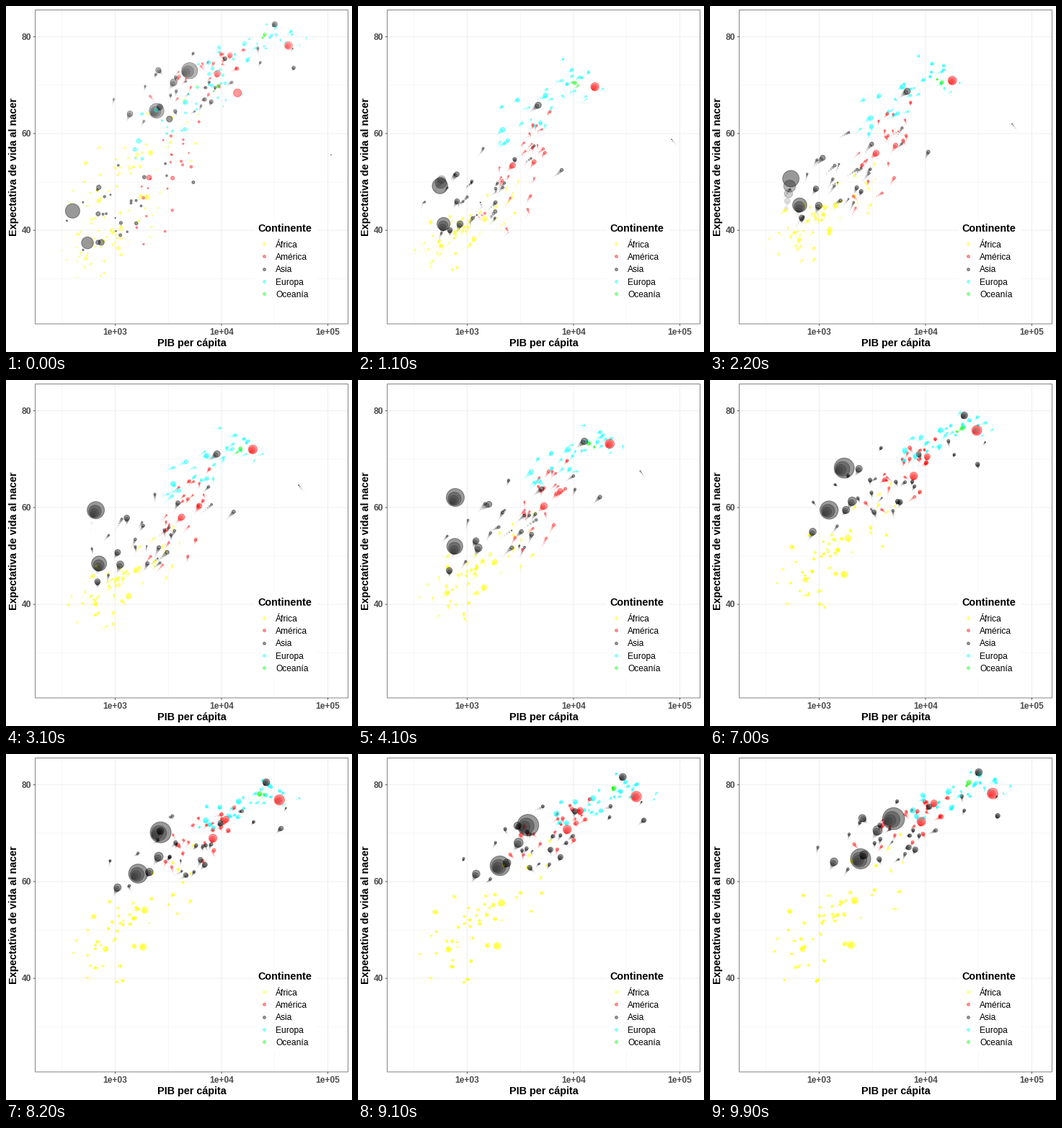
A matplotlib script that plays this animation: 480 px wide and 480 px high, repeating every 10 s.

```python
import numpy as np
import matplotlib.pyplot as plt
from matplotlib.animation import FuncAnimation
from matplotlib.patches import Rectangle

plt.rcParams["font.family"] = "Liberation Sans"

SIZE, FRAMES, WAKE, ALPHA = 480, 100, 10, 0.4
LEFT, RIGHT, TOP, BOTTOM = 40.5, 474.5, 5.5, 441
COLORS = {
    "África": (1, 1, 0), "América": (1, 0, 0), "Asia": (0, 0, 0),
    "Europa": (0, 1, 1), "Oceanía": (0, 1, 0),
}
STEPS = np.arange(12)  # one survey every five years
KEYS = (0, 6, 11)      # surveys at which a path has key points
NOW = np.linspace(0, 11, FRAMES)

rng = np.random.default_rng(7)
xs, ys, radii, tints = [], [], [], []


def px(log_gdp):
    return LEFT + 147.6 * (np.asarray(log_gdp) - 2.2487)


def py(life):
    return BOTTOM - 6.71 * (np.asarray(life) - 20.649)


def add(region, pop, gdp, life, keys=KEYS, wobble=0.0):
    """One country: population in millions (first, last), log GDP and life paths."""
    g = np.interp(STEPS, keys, gdp) + wobble * rng.normal(0, 0.04, 12)
    e = np.interp(STEPS, keys, life) + wobble * rng.normal(0, 0.4, 12)
    xs.append(px(np.interp(NOW, STEPS, g)))
    ys.append(py(np.interp(NOW, STEPS, e)))
    radii.append(15 * np.sqrt(np.interp(NOW, (0, 11), pop) / 1319))
    tints.append(COLORS[region])


def populate(region, count, pop, growth, gdp, gdp_sd, life, life_sd):
    """Countries spread around the regional trend, richer ones living longer."""
    for _ in range(count):
        z, w = rng.normal(size=2)
        z, w = np.clip((z, 0.7 * z + 0.7 * w), -2, 2)
        start = min(pop * np.exp(rng.normal(0, 0.9)), 50)
        add(region, (start, start * growth),
            np.add(gdp, np.multiply(z, gdp_sd)),
            np.add(life, np.multiply(w, life_sd)), wobble=1)


populate("África", 50, 2.7, 3.4, (3, 3.18, 3.2), (.25, .28, .33),
         (39, 51, 54.5), (4.5, 6, 8))
populate("América", 22, 3.5, 2.7, (3.48, 3.79, 3.87), (.17, .15, .22),
         (53, 66, 73.5), (8, 5, 3))
populate("Asia", 24, 7, 2.9, (3.1, 3.65, 3.82), (.33, .43, .46),
         (46.5, 63, 71), (7, 7, 6))
populate("Europa", 30, 8, 1.35, (3.7, 4.15, 4.34), (.24, .2, .23),
         (64.5, 72.8, 77.6), (5, 2.5, 2.5))
populate("Oceanía", 2, 5, 2.2, (4.01, 4.27, 4.47), (.01, .02, .07),
         (69.2, 74.3, 80.7), (.2, .4, .5))

# The largest countries set the picture and follow their own paths
add("África", (33, 135), (3.03, 3.2, 3.3), (36.3, 45.8, 46.9))
add("América", (158, 301), (4.15, 4.4, 4.63), (68.4, 74.7, 78.2))
add("América", (57, 190), (3.32, 3.85, 3.96), (50.9, 63.3, 72.4))
add("América", (30, 109), (3.54, 3.98, 4.08), (50.8, 67.4, 76.2))
add("Asia", (556, 1319), (2.6, 2.76, 2.69, 2.79, 2.98, 3.7),
    (44, 50.5, 44.5, 58.4, 65.5, 73), keys=(0, 1, 2, 3, 6, 11))
add("Asia", (372, 1110), (2.74, 2.93, 3.39), (37.4, 56.6, 64.7))
add("Asia", (82, 224), (2.87, 3.18, 3.55), (37.5, 56.2, 70.6))
add("Asia", (86, 127), (3.51, 4.29, 4.5), (63, 77.1, 82.6))
add("Asia", (41, 169), (2.84, 3.16, 3.42), (43.4, 56.2, 65.5))
add("Asia", (47, 150), (2.84, 2.83, 3.14), (37.5, 50, 64.1))
add("Asia", (0.2, 2.5), (5.03, 4.5, 4.67), (55.6, 71.3, 77.6), keys=(0, 6, 11))

xs, ys, radii = (np.array(v).T for v in (xs, ys, radii))
count = xs.shape[1]

# Wake, oldest first: size and opacity fall off with a cubic
fade = (1 - np.arange(WAKE - 1, -1, -1) / WAKE) ** 3
rgba = np.zeros((WAKE * count, 4))
rgba[:, :3] = np.tile(tints, (WAKE, 1))
rgba[:, 3] = np.repeat(ALPHA * fade, count)

fig = plt.figure(figsize=(SIZE / 72, SIZE / 72), dpi=72, facecolor="white")
ax = fig.add_axes([0, 0, 1, 1])
ax.set(xlim=(0, SIZE), ylim=(SIZE, 0))
ax.axis("off")


def line(x, y, color, width, z):
    ax.plot(x, y, color=color, lw=width, zorder=z, snap=False,
            solid_capstyle="butt")


def label(x, y, s, size=12, **kw):
    ax.text(x, y, s, fontsize=size, va="baseline", zorder=8, **kw)


def box(x0, y0, x1, y1, z, **kw):
    ax.add_patch(Rectangle((x0, y0), x1 - x0, y1 - y0, zorder=z, **kw))


for v in (2.5, 3.5, 4.5, 3, 4, 5):
    line((px(v),) * 2, (TOP, BOTTOM), "#ebebeb", 0.8 if v % 1 == 0 else 0.4, 1)
for v in (30, 50, 70, 40, 60, 80):
    line((LEFT, RIGHT), (py(v),) * 2, "#ebebeb", 0.8 if v % 20 == 0 else 0.4, 1)

dots = ax.scatter(np.zeros(WAKE * count), np.zeros(WAKE * count),
                  facecolors=rgba, edgecolors=rgba, zorder=3,
                  linewidths=np.repeat(0.5 + 0.5 * fade, count))

box(LEFT, TOP, RIGHT, BOTTOM, 5, fill=False, ec="#858585", lw=1, snap=False)
for v in (3, 4, 5):
    line((px(v),) * 2, (BOTTOM, BOTTOM + 2.75), "#333333", 0.8, 5)
    label(px(v), 456, f"1e+0{v}", weight="bold", color="#4d4d4d", ha="center")
for v in (40, 60, 80):
    line((LEFT - 2.75, LEFT), (py(v),) * 2, "#333333", 0.8, 5)
    label(35, py(v) + 4.3, str(v), weight="bold", color="#4d4d4d", ha="right")
label(257.5, 472, "PIB per cápita", 14.4, weight="bold", ha="center")
label(15, 223.5, "Expectativa de vida al nacer", 14.4, weight="bold",
      rotation=90, rotation_mode="anchor", ha="center")

box(344.5, 296.5, 431.5, 413.3, 6, fc="white", ec="none")
label(349.5, 313, "Continente", 14.4, weight="bold")
for i, (name, color) in enumerate(COLORS.items()):
    y = 330.2 + 17.28 * i
    ax.scatter([358.3], [y], s=3.9 ** 2, facecolors=[(*color, ALPHA)],
               edgecolors=[(*color, ALPHA)], linewidths=1, zorder=7)
    label(374, round(y + 4.5), name)


def update(frame):
    past = np.arange(frame - WAKE + 1, frame + 1) % FRAMES
    dots.set_offsets(np.column_stack((xs[past].ravel(), ys[past].ravel())))
    r = 0.3 + radii[past] * fade[:, None]
    dots.set_sizes((2 * r.ravel()) ** 2)
    return (dots,)


anim = FuncAnimation(fig, update, frames=FRAMES, interval=100,
                     repeat=True, repeat_delay=0)
plt.show()
```
